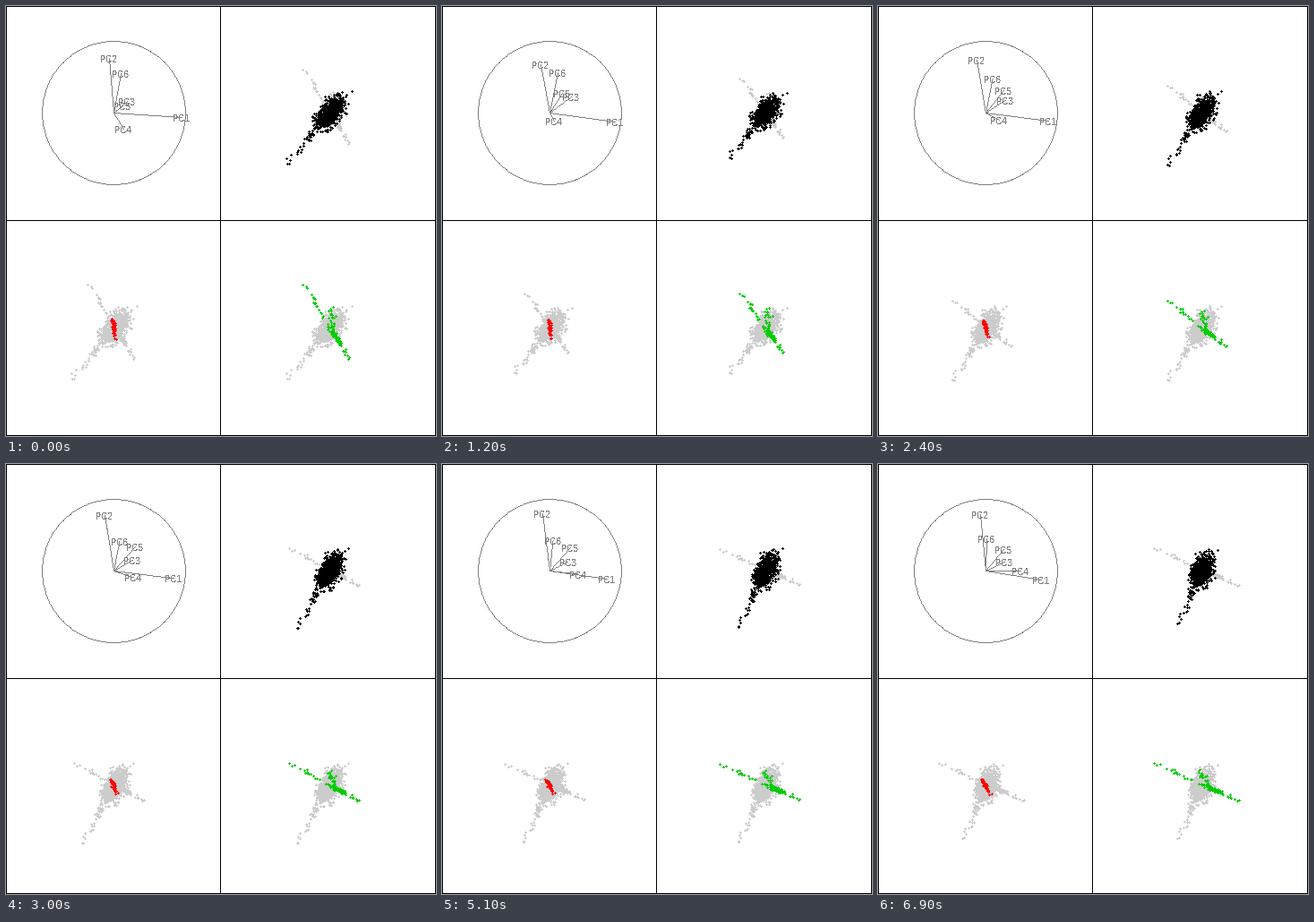
Animation of 480 by 480 pixels, one loop 9900 ms. Source, as a matplotlib script:

```python
import numpy as np
import matplotlib.pyplot as plt
from matplotlib.animation import FuncAnimation
from matplotlib.markers import MarkerStyle

SIZE, DPI = 480, 80
PX = 72 / DPI
GREY, PALE = "#7f7f7f", "#cccccc"
STEP = 300
RADIUS, MID = 80, np.array([120, 120])

plt.rcParams["text.hinting"] = "native"
plt.rcParams["text.hinting_factor"] = 1

# slots each view stays on; the tour slows down and rests at the end
HOLD = [1] * 4 + [2] + [1] * 5 + [2] * 6 + [10]
VIEWS = np.repeat(np.arange(len(HOLD)), HOLD)

# x, y from the panel centre at the key views
KEYS = [0, 4, 10, 16]
AXES = np.array([
    [(76, 5), (73, 10), (66, 8), (62, 10)],
    [(-5, -61), (-10, -54), (-10, -64), (-6, -63)],
    [(15, -13), (24, -18), (20, -11), (21, -10)],
    [(11, 18), (5, 9), (25, 7), (39, 0)],
    [(10, -8), (14, -22), (26, -28), (20, -24)],
    [(8, -44), (9, -45), (6, -31), (1, -36)],
])
ENDS = np.array([  # both ends of the streak, tip of the cloud's tail
    [(-27, -49), (-26, -39), (-45, -23), (-50, -26)],
    [(22, 33), (20, 26), (35, 13), (41, 15)],
    [(-46, 57), (-39, 50), (-33, 66), (-23, 58)],
])

rng = np.random.default_rng(11)


def at(tracks, view):
    """Positions of all tracks at a view, blended between key views."""
    i = min(np.searchsorted(KEYS, view, "right") - 1, len(KEYS) - 2)
    t = (view - KEYS[i]) / (KEYS[i + 1] - KEYS[i])
    return tracks[:, i] * (1 - t) + tracks[:, i + 1] * t


def along(share, spread):
    """Shares of a path, with scatter in all six dimensions."""
    share = np.asarray(share)[:, None]
    return share, rng.normal(0, spread, (len(share), 6))


body = along(rng.normal(0, 0.11, 800), 5)
tail = along(np.append(0.15 + 0.75 * rng.random(75) ** 2.2, [0.94, 0.97, 1]), 2.5)
small = along(np.append(rng.normal(0.2, 0.55, 60).clip(-0.9, 1), -1.4), 1)
streak = along(np.concatenate([
    [0, 0.02, 0.06], rng.uniform(0.1, 0.55, 15),
    rng.normal(0.69, 0.06, 75),
    rng.uniform(0.75, 0.95, 8), [0.96, 0.99, 1],
]), 1.5)
branch = along(rng.random(24), 1.8)


def points(view):
    """The three groups of points in the plane."""
    axes = at(AXES, view)
    far, near, tip = at(ENDS, view)
    top = 0.14 * axes[5] + 0.07 * far
    fork = 0.45 * axes[5] + 0.07 * far
    heart = far + 0.69 * (near - far)

    def place(part, start, end):
        share, scatter = part
        return start + share * (end - start) + scatter @ axes / RADIUS

    origin = np.array([1, -1])
    return [
        np.vstack([place(body, origin, tip), place(tail, 0 * tip, tip)]),
        place(small, 0 * top, top),
        np.vstack([place(streak, far, near), place(branch, fork, heart)]),
    ]


def stroke(path):
    """Pixels of a one pixel wide line through the corners of a path."""
    parts = []
    for a, b in zip(path[:-1], path[1:]):
        n = int(np.ceil(np.abs(b - a).max())) + 1
        parts.append(np.linspace(a, b, n))
    return np.round(np.vstack(parts)).T


fig = plt.figure(figsize=(SIZE / DPI, SIZE / DPI), dpi=DPI, facecolor="white")
ax = fig.add_axes([0, 0, 1, 1])
ax.set_xlim(0, SIZE)
ax.set_ylim(SIZE, 0)
ax.axis("off")


def pen():
    return ax.plot([], [], ls="none", marker=",", color=GREY)[0]


def dots(color):
    plus = MarkerStyle("+", capstyle="projecting")
    return ax.plot([], [], ls="none", marker=plus, ms=2 * PX, mew=PX,
                   color=color, aa=False)[0]


for p in (0, 239, 479):
    ax.plot([0, SIZE], [p, p], color="black", lw=PX, zorder=5)
    ax.plot([p, p], [0, SIZE], color="black", lw=PX, zorder=5)

turn = np.linspace(0, 2 * np.pi, 50)
pen().set_data(*stroke(MID + RADIUS * np.column_stack([np.cos(turn), np.sin(turn)])))

spokes = [pen() for _ in AXES]
labels = [ax.text(0, 0, f"PC{i + 1}", color=GREY, family="Liberation Sans",
                  size=11 * PX, ha="center", va="baseline", antialiased=False)
          for i in range(len(AXES))]

PANELS = [("#000000", (360, 120)), ("#ff0000", (120, 360)), ("#00cd00", (360, 360))]
layers = [(dots(PALE), dots(color), np.array(mid)) for color, mid in PANELS]


def update(slot):
    view = VIEWS[slot]
    for spoke, label, end in zip(spokes, labels, MID + at(AXES, view)):
        spoke.set_data(*stroke([MID, end]))
        label.set_position(end + [0, 4])
    groups = points(view)
    everything = np.vstack(groups)
    for (back, front, mid), own in zip(layers, groups):
        back.set_data(*(everything + mid).T)
        front.set_data(*(own + mid).T)
    return spokes + labels


anim = FuncAnimation(fig, update, frames=len(VIEWS), interval=STEP,
                     init_func=lambda: update(0), repeat=True, repeat_delay=0)
plt.show()
```
